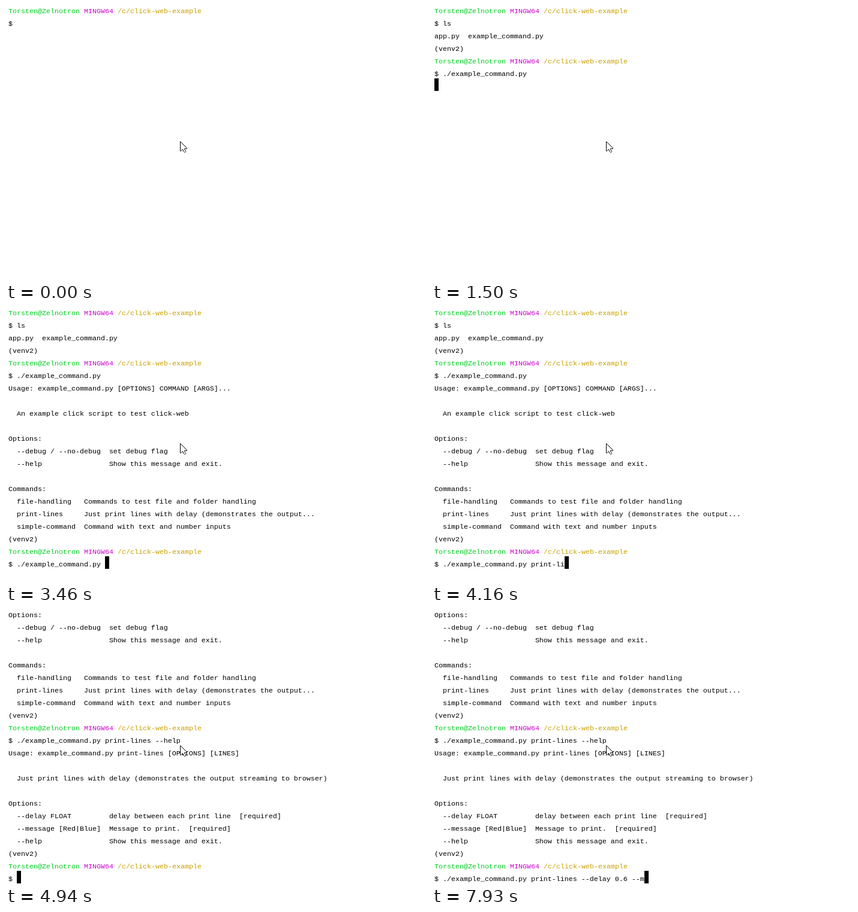
An HTML page with a canvas that plays this animation: 700x458 px, repeating every 8000 ms.

```html
<!DOCTYPE html>
<html lang="en">
<head>
<meta charset="utf-8">
<title>Terminal session</title>
<style>
  html, body { margin: 0; width: 100%; height: 100%; overflow: hidden; background: #fff; }
  canvas { display: block; width: 700px; height: 458px; }
</style>
</head>
<body>
<canvas id="stage" width="700" height="458"></canvas>
<script>
const ctx = document.getElementById('stage').getContext('2d');
const LOOP = 8000;
const LEFT = 4, CELL = 7, ROW = 21, ROWS = 22, BASELINE = 12, ROW_TOP = -5;

const PROMPT = [
  [0, 'Torsten@Zelnotron', '#00cf20'],
  [18, 'MINGW64', '#d000d0'],
  [26, '/c/click-web-example', '#c8a000'],
];
const SCRIPT = './example_command.py';
const SUB = SCRIPT + ' print-lines';

const listing = ['app.py  example_command.py'];
const mainHelp = [
  'Usage: example_command.py [OPTIONS] COMMAND [ARGS]...',
  '',
  '  An example click script to test click-web',
  '',
  'Options:',
  '  --debug / --no-debug  set debug flag',
  '  --help                Show this message and exit.',
  '',
  'Commands:',
  '  file-handling   Commands to test file and folder handling',
  '  print-lines     Just print lines with delay (demonstrates the output...',
  '  simple-command  Command with text and number inputs',
];
const subHelp = [
  'Usage: example_command.py print-lines [OPTIONS] [LINES]',
  '',
  '  Just print lines with delay (demonstrates the output streaming to browser)',
  '',
  'Options:',
  '  --delay FLOAT         delay between each print line  [required]',
  '  --message [Red|Blue]  Message to print.  [required]',
  '  --help                Show this message and exit.',
];

// Each state holds every line so far; the cursor sits at the end of the last.
const states = [];
let log = [PROMPT];

const show = (time, lines, cursor = true) => states.push({ time, lines, cursor });
const input = (time, text, cursor) => show(time, [...log, '$ ' + text], cursor);
const type = (start, step, texts) => texts.forEach((text, i) => input(start + i * step, text));
const prefixes = (base, text, lengths) => lengths.map(n => base + text.slice(0, n));

function enter(time, command) {
  log = [...log, '$ ' + command];
  show(time, [...log, '']);
}
function finish(time, output) {
  log = [...log, ...output, '(venv2)', PROMPT];
  input(time, '');
}

input(0, '', false);
type(70, 80, ['l', 'ls']);
enter(240, 'ls');
finish(320, listing);

type(1130, 74, ['.', './', './e', './ex', SCRIPT + ' ']);
enter(1500, SCRIPT);
finish(1570, mainHelp);
input(2150, '', false);

type(3460, 78, prefixes(SCRIPT + ' ', 'print-lines', [0, 1, 2, 3, 4, 5, 6, 7, 8, 9, 11]));
type(4320, 78, prefixes(SUB, ' --help', [1, 2, 3, 4, 5, 7]));
enter(4790, SUB + ' --help');
show(4860, [...log, ...subHelp, '']);
finish(4940, subHelp);

type(6750, 80, prefixes(SUB, ' --help', [7, 5, 3]));
type(6990, 80, prefixes(SUB + ' --', 'delay 0.', [1, 2, 3, 4, 5, 6, 7, 8]));
type(7620, 77.5, prefixes(SUB + ' --delay 0.', '6 --m', [1, 2, 3, 4, 5]));

function drawText(column, row, text, color) {
  ctx.fillStyle = color;
  ctx.fillText(text, LEFT + column * CELL, BASELINE + row * ROW);
}

function drawLine(line, row) {
  if (line === PROMPT) PROMPT.forEach(([column, text, color]) => drawText(column, row, text, color));
  else drawText(0, row, line, '#000');
}

const pointer = new Path2D('M290.5 226.5v16h1l3 -3l2 4l1 1h1l1 -1v-1l-2 -3v-1h4v-1z');

function drawPointer() {
  ctx.fillStyle = '#fff';
  ctx.fill(pointer);
  ctx.strokeStyle = '#000';
  ctx.lineWidth = 1;
  ctx.lineJoin = 'round';
  ctx.stroke(pointer);
}

function draw(time) {
  const { lines, cursor } = states.findLast(state => state.time <= time);
  const visible = lines.slice(-ROWS);
  ctx.fillStyle = '#fff';
  ctx.fillRect(0, 0, 700, 458);
  ctx.font = '11.666px "Liberation Mono", monospace';
  visible.forEach(drawLine);
  if (cursor) {
    const row = visible.length - 1;
    ctx.fillStyle = '#000';
    ctx.fillRect(LEFT + visible[row].length * CELL, ROW_TOP + row * ROW, CELL, ROW);
  }
  drawPointer();
}

const began = performance.now();
function tick() {
  draw((performance.now() - began) % LOOP);
  requestAnimationFrame(tick);
}
tick();
</script>
</body>
</html>
```
